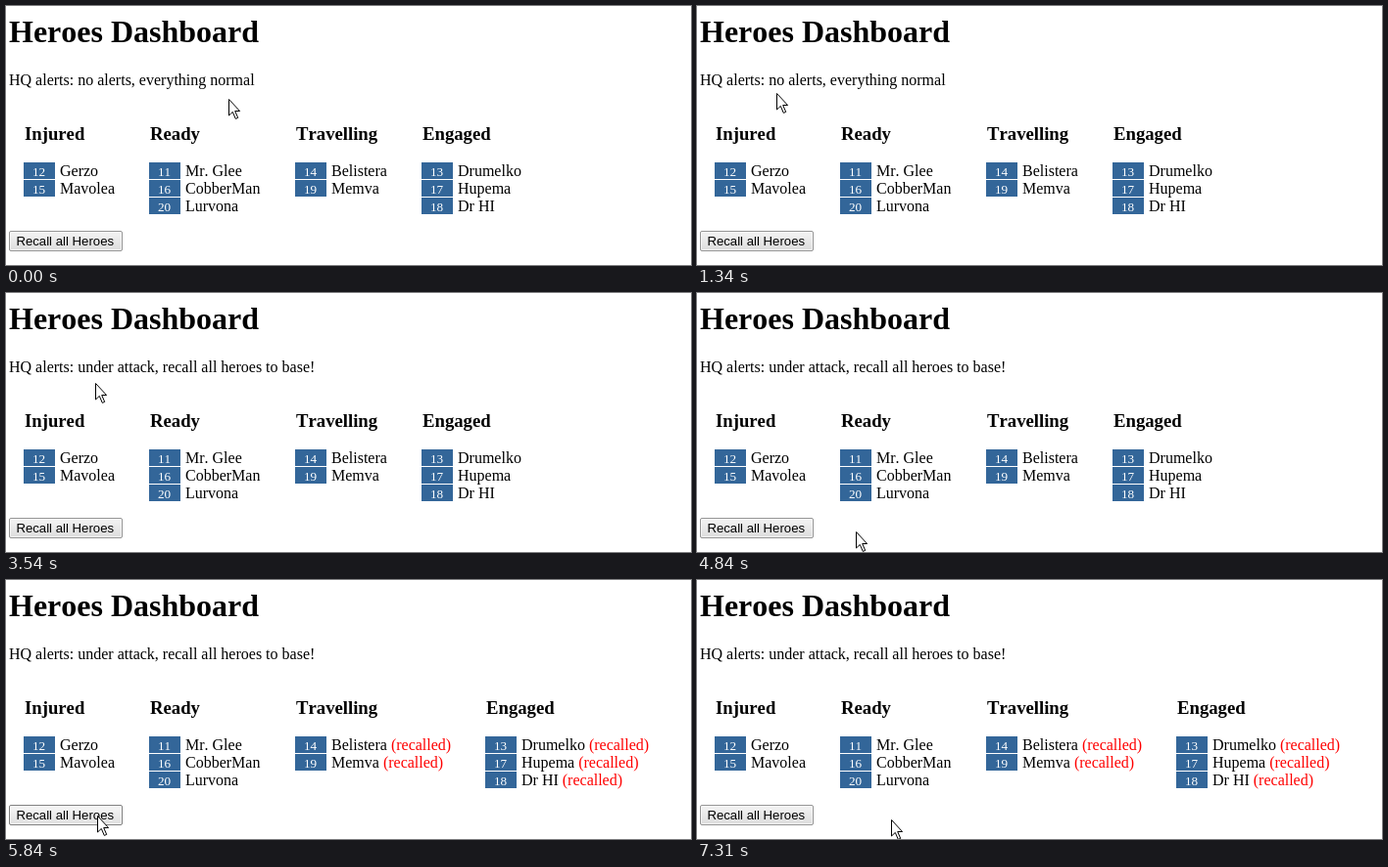
Animation of 699x265 px, one loop 8 s. Source, as an HTML page:

```html
<!DOCTYPE html>
<html lang="en">
<head>
<meta charset="utf-8">
<title>Heroes Dashboard</title>
<style>
  html, body { margin: 0; width: 100%; height: 100%; overflow: hidden; background: #fff; }
  svg { display: block; }
  text { font: 16px "Liberation Serif", "Times New Roman", serif; font-kerning: none; fill: #000; }
  .h1 { font-size: 32px; font-weight: bold; }
  .h3 { font-size: 18.72px; font-weight: bold; }
  .num { font-size: 13.2px; fill: #fff; }
  .btn { font: 13.2px "Liberation Sans", Arial, sans-serif; }
  .recalled { fill: #f00; }
  .chip { fill: #369; shape-rendering: crispEdges; }
</style>
</head>
<body>
<svg width="699" height="265" viewBox="0 0 699 265">
  <defs>
    <linearGradient id="idle" x2="0" y2="1"><stop stop-color="#f4f4f4"/><stop offset="1" stop-color="#dcdcdc"/></linearGradient>
    <linearGradient id="hover" x2="0" y2="1"><stop stop-color="#f7f7f7"/><stop offset="1" stop-color="#dfdfdf"/></linearGradient>
    <linearGradient id="press" x2="0" y2="1"><stop stop-color="#e8e8e8"/><stop offset="1" stop-color="#eee"/></linearGradient>
  </defs>
  <text class="h1" x="3" y="37">Heroes Dashboard</text>
  <text id="alert" x="3" y="81"></text>
  <g id="columns"></g>
  <rect id="box" x="3.5" y="230.5" width="115" height="20" rx="1.5"/>
  <rect x="4.5" y="231.5" width="113" height="18" rx="1" fill="none" stroke="#fff" stroke-opacity=".6"/>
  <text class="btn" x="10.4" y="245">Recall all Heroes</text>
  <circle id="ring" cx="94.5" cy="242" r="10" fill="none" stroke="#111"/>
  <path id="arrow" d="M.5 .5V17L4.3 13.4L7.3 20.4L9.7 19.4L6.7 12.5H11.6Z" fill="#fff" stroke="#000"/>
  <path id="beam" d="M0 .5H3M4 .5H7M3.5 1V15M0 15.5H3M4 15.5H7" fill="none" stroke="#000" shape-rendering="crispEdges"/>
</svg>
<script>
const LOOP = 8000, STEP = 140;
const ALERT_AT = 2260, PRESS_AT = 5690, RECALL_AT = 5840;
const LEFT = 18.2, ROW = 18, NAME_X = 37, GAP = 72.3;

const columns = [
  { title: "Injured", heroes: { 12: "Gerzo", 15: "Mavolea" } },
  { title: "Ready", heroes: { 11: "Mr. Glee", 16: "CobberMan", 20: "Lurvona" } },
  { title: "Travelling", away: true, heroes: { 14: "Belistera", 19: "Memva" } },
  { title: "Engaged", away: true, heroes: { 13: "Drumelko", 17: "Hupema", 18: "Dr HI" } }
];

const inOut = p => p < 0.5 ? 4 * p ** 3 : 1 - 4 * (1 - p) ** 3;
const out = p => 1 - (1 - p) ** 2.5;
const swing = p => Math.sin(p * Math.PI / 2) ** 1.5;

// Each glide leaves from where the last one ended and advances once per STEP.
const glides = [
  { at: 500, steps: 7, to: [81, 89], ease: inOut },
  { at: 1460, steps: 2, to: [86, 66], ease: out },
  { at: 3540, steps: 1, to: [91, 92], ease: out },
  { at: 3690, steps: 3, to: [164, 244], ease: out },
  { at: 4840, steps: 1, to: [162, 244], ease: out },
  { at: 4990, steps: 4, to: [93, 241], ease: out },
  { at: 6740, steps: 5, to: [198, 245], ease: swing }
];

function pointer(t) {
  let pos = [227, 95];
  for (const { at, steps, to, ease } of glides) {
    if (t < at) break;
    const p = ease(Math.min(1, (Math.floor((t - at) / STEP) + 1) / steps));
    pos = pos.map((from, i) => Math.round(from + (to[i] - from) * p));
  }
  return pos;
}

const $ = id => document.getElementById(id);
const show = (el, on) => { el.style.display = on ? "" : "none"; };
const move = (el, x, y) => el.setAttribute("transform", `translate(${x} ${y})`);

function add(parent, tag, attrs = {}, text = "") {
  const el = document.createElementNS("http://www.w3.org/2000/svg", tag);
  for (const key in attrs) el.setAttribute(key, attrs[key]);
  el.textContent = text;
  return parent.appendChild(el);
}

for (const col of columns) {
  col.group = add($("columns"), "g");
  add(col.group, "text", { class: "h3", x: 1, y: 137 }, col.title);
  col.lines = Object.entries(col.heroes).map(([id, name], row) => {
    const y = 160 + row * ROW;
    add(col.group, "rect", { class: "chip", y, width: 32, height: 17 });
    add(col.group, "text", { class: "num", x: 9, y: y + 14 }, id);
    const label = add(col.group, "text", { x: NAME_X, y: y + 14 }, name);
    return { label, note: add(label, "tspan", { class: "recalled" }) };
  });
}

// Columns are as wide as their longest label, so notes push later ones right.
function layout(recalled) {
  let x = LEFT;
  for (const { group, lines, away } of columns) {
    for (const { note } of lines) note.textContent = recalled && away ? " (recalled)" : "";
    move(group, Math.floor(x), 0);
    x += GAP + Math.max(...lines.map(line => line.label.getComputedTextLength()));
  }
}

let laidOut;
function draw(t) {
  const [x, y] = pointer(t);
  const recalled = t >= RECALL_AT;
  const pressed = t >= PRESS_AT && !recalled;
  const overText = y < 84;
  const overButton = x >= 3 && x < 119 && y >= 230 && y < 251;

  if (laidOut !== recalled) layout(laidOut = recalled);
  $("alert").textContent = "HQ alerts: " +
    (t < ALERT_AT ? "no alerts, everything normal" : "under attack, recall all heroes to base!");

  $("box").setAttribute("fill", `url(#${pressed ? "press" : overButton ? "hover" : "idle"})`);
  $("box").setAttribute("stroke", overButton ? "#808080" : "#959595");
  show($("ring"), pressed);

  show($("arrow"), !overText);
  show($("beam"), overText);
  move($("arrow"), x, y);
  move($("beam"), x, y);
}

const start = performance.now();
function tick() {
  draw((performance.now() - start) % LOOP);
  requestAnimationFrame(tick);
}
tick();
</script>
</body>
</html>
```
